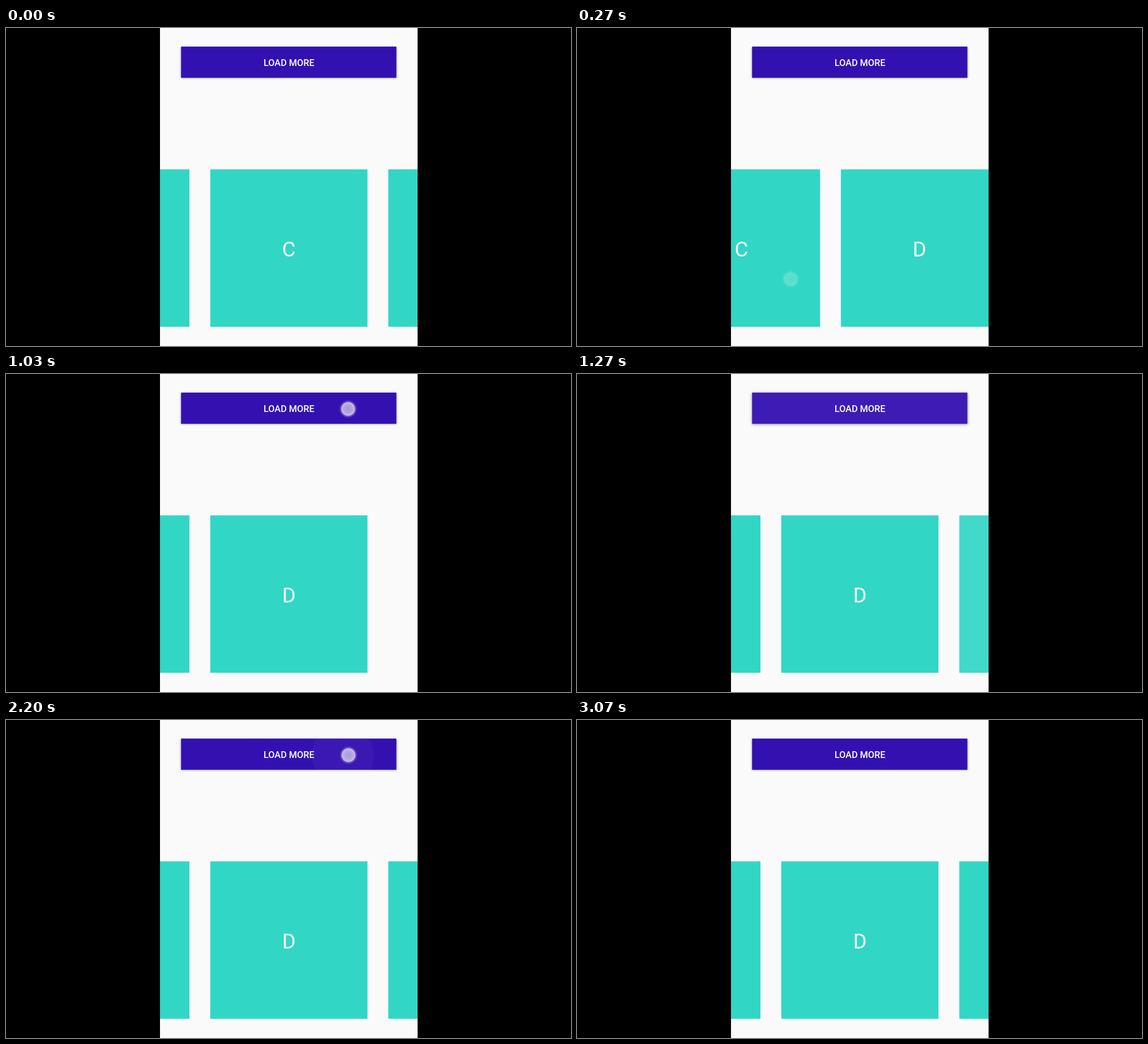
Animation of 998x561 px, one loop 3180 ms. Source, as an HTML page with a canvas:

```html
<!DOCTYPE html>
<html lang="en">
<head>
<meta charset="utf-8">
<title>Load more carousel</title>
<style>
html, body { margin: 0; width: 100%; height: 100%; overflow: hidden; background: #000; }
canvas { display: block; }
</style>
</head>
<body>
<canvas id="stage" width="998" height="561"></canvas>
<script>
const ctx = document.getElementById('stage').getContext('2d');
const LOOP = 3180;
const PITCH = 314.5, CARD = 277.7, CARD_X = 360.8, CARD_Y = 249.4;
const BTN = { x: 309.3, y: 32.8, w: 380.2, h: 55 };
const SWIPE = { down: 30, up: 190, turn: 270, end: 541, turnAt: 208 };
const PRESSES = [
  { start: 1030, length: 270, x: 604.3, y: 61.7 },
  { start: 1740, length: 230, x: 606.7, y: 63.3 },
  { start: 2170, length: 400, x: 605, y: 62 },
  { start: 2770, length: 300, x: 605, y: 62 }
];

const clamp = v => Math.max(0, Math.min(1, v));
const ramp = (t, a, b) => clamp((t - a) / (b - a));

// Accelerating drag, then a cubic settle onto the next card.
function scrollAt(t) {
  const { down, turn, end, turnAt } = SWIPE;
  if (t < turn) return turnAt * ramp(t, down, turn) ** 1.35;
  return PITCH - (PITCH - turnAt) * (1 - ramp(t, turn, end)) ** 3;
}

function label(text, x, y, font) {
  ctx.font = font + ' Roboto, sans-serif';
  ctx.textAlign = 'center';
  ctx.fillStyle = '#fff';
  ctx.fillText(text, x, y);
}

function drawCards(t) {
  const scroll = scrollAt(t);
  [...'ABCDE'].forEach((letter, i) => {
    const x = CARD_X + (i - 2) * PITCH - scroll;
    ctx.globalAlpha = letter === 'E' ? ramp(t, 1160, 1280) : 1;
    ctx.fillStyle = '#32d6c5';
    ctx.fillRect(x, CARD_Y, CARD, CARD);
    label(letter, x + CARD / 2, 402.8, '36.6px');
  });
  ctx.globalAlpha = 1;
}

function drawButton(t) {
  const { x, y, w, h } = BTN;
  const press = PRESSES.find(p => t >= p.start && t < p.start + p.length);
  const age = press ? t - press.start : 0;
  const fade = press ? 1 - ramp(age, press.length - 140, press.length) : 0;
  const lift = ramp(age, 20, 120) * fade;

  ctx.save();
  ctx.shadowColor = 'rgba(0,0,0,.4)';
  ctx.shadowBlur = 3.5 + 5 * lift;
  ctx.shadowOffsetY = 1.3 + 1.7 * lift;
  ctx.fillStyle = '#3311b1';
  ctx.fillRect(x, y, w, h);
  ctx.restore();

  if (press) {
    const grow = 1 - (1 - ramp(age, 20, 245)) ** 2;
    const cx = press.x + (x + w / 2 - press.x) * grow;
    const cy = press.y + (y + h / 2 - press.y) * grow;
    ctx.save();
    ctx.beginPath();
    ctx.rect(x, y, w, h);
    ctx.clip();
    ctx.globalAlpha = 0.22 * ramp(age, 20, 95) * fade;
    ctx.fillStyle = '#fff';
    ctx.beginPath();
    ctx.arc(cx, cy, 40 + 155 * grow, 0, 7);
    ctx.fill();
    ctx.restore();
  }
  label('LOAD MORE', 499.8, 66.8, '500 16.3px');
}

function drawTouch(x, y, alpha) {
  if (alpha <= 0) return;
  const g = ctx.createRadialGradient(x, y, 0, x, y, 16);
  [[0, .57], [.45, .62], [.72, .71], [.78, .3], [1, 0]]
    .forEach(([at, a]) => g.addColorStop(at, `rgba(255,255,255,${a})`));
  ctx.globalAlpha = alpha;
  ctx.fillStyle = g;
  ctx.fillRect(x - 16, y - 16, 32, 32);
  ctx.globalAlpha = 1;
}

function drawTouches(t) {
  const { down, up } = SWIPE;
  if (t >= down) {
    const x = 377.4 + scrollAt(up) - scrollAt(Math.min(t, up));
    drawTouch(x, 443, 1 - ramp(t, up, 310));
  }
  for (const { start, length, x, y } of PRESSES) {
    if (t >= start) drawTouch(x, y, 1 - ramp(t - start, length * .3, length * .3 + 110));
  }
}

function draw(t) {
  ctx.fillStyle = '#000';
  ctx.fillRect(0, 0, 998, 561);
  ctx.save();
  ctx.beginPath();
  ctx.rect(272, 0, 455, 561);
  ctx.clip();
  ctx.fillStyle = '#fafafa';
  ctx.fillRect(272, 0, 455, 561);
  drawCards(t);
  drawButton(t);
  drawTouches(t);
  ctx.restore();
}

const begin = performance.now();
function tick() {
  draw((performance.now() - begin) % LOOP);
  requestAnimationFrame(tick);
}
tick();
</script>
</body>
</html>
```
